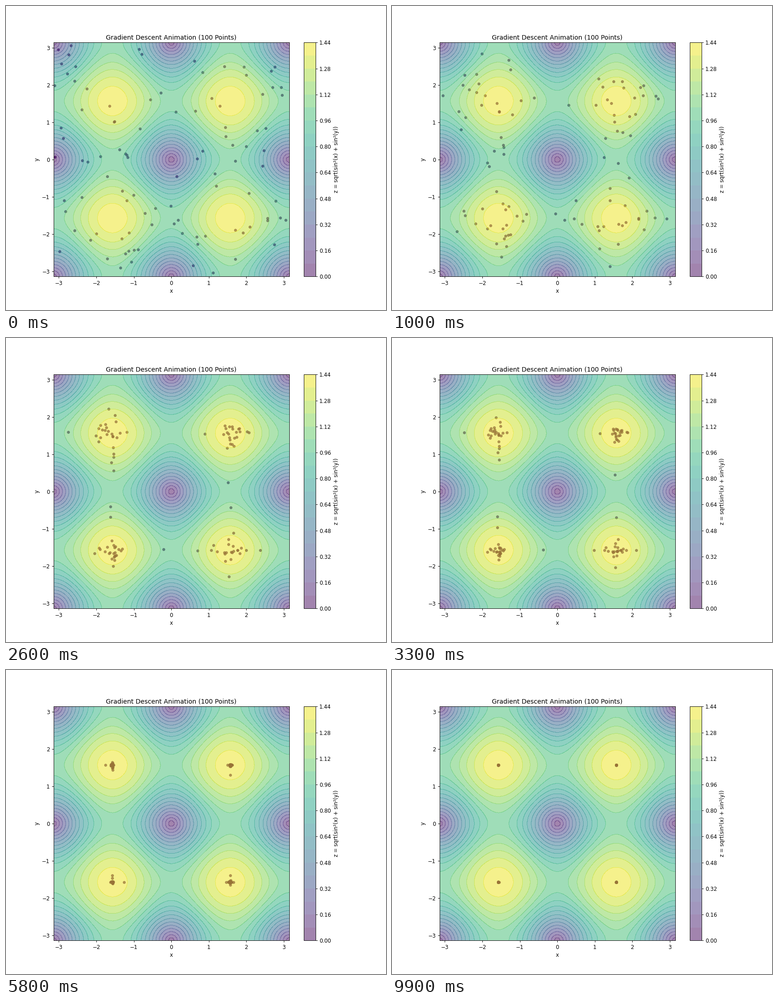
Animation of 837 by 669 pixels, one loop 10000 ms. Source, as a matplotlib script:

```python
import numpy as np
import matplotlib.pyplot as plt
from matplotlib.animation import FuncAnimation

FRAMES = 100
RATE = 0.1
DPI = 83.625


def height(x, y):
    return np.sqrt(np.sin(x) ** 2 + np.sin(y) ** 2)


def step(p):
    """Move every point uphill along the gradient of the surface."""
    z = height(p[:, 0], p[:, 1])[:, None]
    return p + RATE * np.sin(p) * np.cos(p) / z


np.random.seed(42)
path = [np.random.uniform(-np.pi, np.pi, (100, 2))]
for _ in range(FRAMES - 1):
    path.append(step(path[-1]))

fig, ax = plt.subplots(figsize=(10.009, 8), dpi=DPI)
axis = np.linspace(-np.pi, np.pi, 100)
X, Y = np.meshgrid(axis, axis)

# The translucent surface lies over the dots.
dots = ax.scatter(path[0][:, 0], path[0][:, 1], s=20, color=plt.cm.viridis(0.0), alpha=0.7)
surface = ax.contourf(X, Y, height(X, Y), levels=20, cmap="viridis", alpha=0.5)
fig.colorbar(surface, ax=ax, label="z = sqrt(sin²(x) + sin²(y))")

ax.set(xlim=(-np.pi, np.pi), ylim=(-np.pi, np.pi), xlabel="x", ylabel="y",
       title="Gradient Descent Animation (100 Points)")


def update(i):
    dots.set_offsets(path[i])
    return dots,


anim = FuncAnimation(fig, update, frames=FRAMES, interval=100, repeat=True, repeat_delay=0)
plt.show()
```
